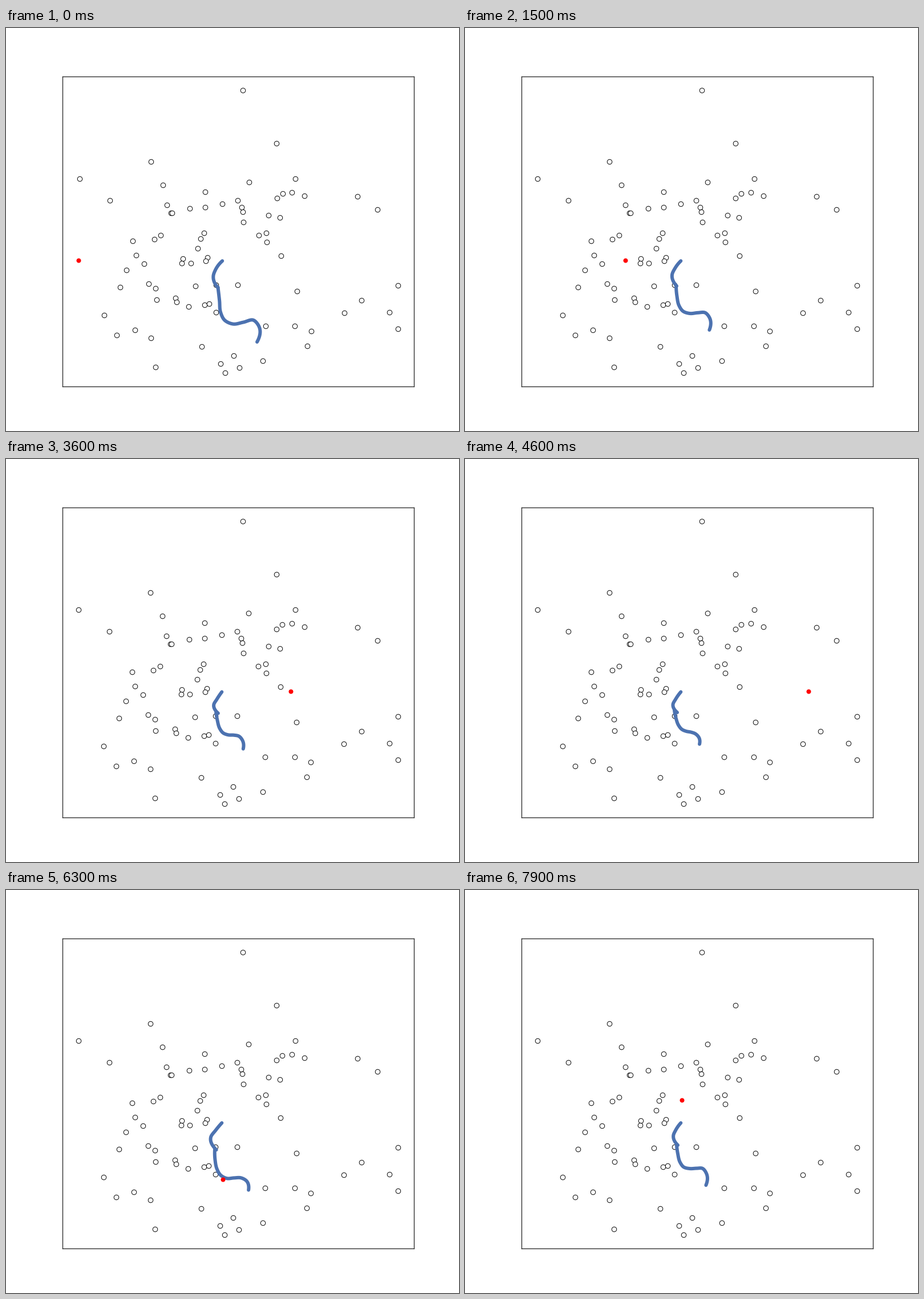
These frames come from a looping animation (794 px wide and 706 px high, 8 s). A matplotlib script:

```python
import numpy as np
import matplotlib.pyplot as plt
from matplotlib.animation import FuncAnimation

FRAMES, STEP_MS = 80, 100
SWEEP = 50                      # frames per sweep of the probe
HALF = (SWEEP - 1) / 2
CENTRE = np.array([379.5, 407.0])
PACE = np.array([10.363, -8.65])  # px per frame: rightwards, then upwards
ORIGIN = (378.3, 408)
PX = 0.72                       # points per pixel at 100 dpi

# Scattered samples, in stage pixels
UPPER = [
    (414.6, 109.4), (473.6, 202), (252.7, 234), (127.2, 264), (274, 275),
    (181, 302), (281, 310), (288, 324), (290, 324), (321, 316), (348, 287),
    (348, 314), (378, 308), (425, 270), (405, 302), (414, 322), (412.4, 314),
    (415.6, 340), (474, 298), (484, 290), (500.7, 288), (506.7, 264),
    (522.7, 294), (459.6, 328), (479.7, 332), (616, 295), (650.8, 318),
    (442, 363), (455, 359), (456, 375), (481, 399), (221, 373),
    (258.4, 370), (270, 363), (226.4, 398), (345.8, 359), (340, 369),
    (334.48, 386), (352, 402), (308.45, 404),
]
LOWER = [
    (240.4, 413), (210, 424), (198.4, 454), (307, 412), (322.45, 412),
    (349, 408), (249, 448), (261, 456), (262.4, 476), (331, 452),
    (366.6, 450), (405, 450), (296, 473), (298, 480), (319, 488),
    (347, 485), (355, 483), (367, 498), (171, 503), (193, 538),
    (224.4, 529), (253, 543), (261, 594), (342, 558), (398, 574),
    (375, 588), (383, 603.6), (408, 595), (449.6, 583), (454, 522),
    (505.7, 522), (534.2, 531), (527.2, 557), (509.2, 461), (592.4, 499),
    (623, 477), (672, 498), (686.6, 451), (686.5, 527),
]
POINTS = np.array(UPPER + LOWER)

# Curve poses by probe offset: three knots of the head, then nine of the tail
ACROSS = {
    -24.5: [366, 424, 362.5, 434, 370.7, 455,
            370.5, 454, 373.3, 478, 375.2, 498, 382, 511.5, 397, 518.5,
            415, 515.5, 433, 511.8, 442.8, 523, 439.3, 550],
    -9.5: [368, 421, 363, 432, 371, 452,
           370, 452, 371.5, 470, 375, 486, 382, 496, 394, 500,
           408, 498.8, 421, 498.8, 428.8, 508, 428.3, 529],
    2.5: [369, 421, 363.7, 431, 371.5, 448,
          369, 447, 370.7, 462, 375, 478, 381, 486, 391, 489.5,
          403, 489.3, 413, 490.5, 420, 499, 420.7, 516],
    21.5: [369, 421, 364.5, 430, 372, 444,
           367, 440, 370, 455, 374, 466, 380, 473.5, 388, 477,
           396, 478.5, 404, 481.5, 410.5, 489, 411, 499.5],
}
UPWARD = {
    -18.5: [367, 420.5, 355.5, 434, 368, 460,
            364.5, 459, 363.8, 480, 366.5, 498, 373, 510.5, 385, 517,
            398, 515.5, 412, 514, 425, 519, 429.2, 533.5],
    -4.5: [368, 421, 362, 432, 370, 451,
           368, 450, 369.3, 467, 373, 482, 379, 491, 390, 496,
           402, 495.5, 413, 495.8, 421.5, 503, 422.7, 520],
    4.5: [369, 421, 365.3, 430, 373, 447,
          371, 447, 373, 462, 377, 477, 383, 485, 394, 488,
          406, 487.5, 416, 487.5, 423.5, 497, 422.3, 517],
}


def fit(poses, degree):
    return np.polyfit(list(poses), np.array(list(poses.values())), degree)


def pose(coef, s):
    flat = sum(c * s ** k for k, c in enumerate(coef[::-1]))
    return flat.reshape(-1, 2)


def smooth(knots, n=14):
    """Cubic Hermite curve through the knots."""
    gap = np.hypot(*np.diff(knots, axis=0).T)
    t = np.r_[0, np.cumsum(gap)]
    slope = np.gradient(knots, t, axis=0, edge_order=2)
    u = np.linspace(0, 1, n)[:, None]
    parts = []
    for i, h in enumerate(gap):
        parts.append((1 + 2 * u) * (1 - u) ** 2 * knots[i]
                     + u * (1 - u) ** 2 * h * slope[i]
                     + u ** 2 * (3 - 2 * u) * knots[i + 1]
                     + u ** 2 * (u - 1) * h * slope[i + 1])
    return np.vstack(parts)


across = fit(ACROSS, 3)
upward = fit({**UPWARD, 0.0: pose(across, 0).ravel()}, 2)

fig, ax = plt.subplots(figsize=(7.94, 7.06), dpi=100, facecolor="white")
fig.subplots_adjust(left=0.125, right=0.9, bottom=0.11, top=0.88)
ax.set(xticks=[], yticks=[])
for spine in ax.spines.values():
    spine.set(linewidth=1.3 * PX, edgecolor="#262626")

ax.plot(*POINTS.T, "o", ms=8.5 * PX, mfc="white", mec="black", mew=0.95 * PX,
        zorder=2)
head, tail = (ax.plot([], [], color="#4c72b0", lw=6 * PX, zorder=3,
                      solid_capstyle="round", solid_joinstyle="round")[0]
              for _ in range(2))
probe, = ax.plot([], [], "o", color="red", ms=8 * PX, mew=0, zorder=4)


def fit_view(spot):
    every = np.vstack([POINTS, spot])
    lo, hi = every.min(axis=0), every.max(axis=0)
    pad = (hi - lo) / 20
    lo, hi = lo - pad, hi + pad
    ax.set_xlim(lo[0], hi[0])
    ax.set_ylim(hi[1], lo[1])


def draw(i):
    axis, step = divmod(i, SWEEP)
    s = step - HALF
    spot = CENTRE.copy()
    spot[axis] += PACE[axis] * s
    knots = pose(upward if axis else across, s)
    head.set_data(*smooth(np.vstack([ORIGIN, knots[:3]])).T)
    tail.set_data(*smooth(knots[3:]).T)
    probe.set_data([spot[0]], [spot[1]])
    fit_view(spot)
    return head, tail, probe


anim = FuncAnimation(fig, draw, frames=FRAMES, interval=STEP_MS,
                     repeat=True, repeat_delay=0, blit=False)
plt.show()
```
